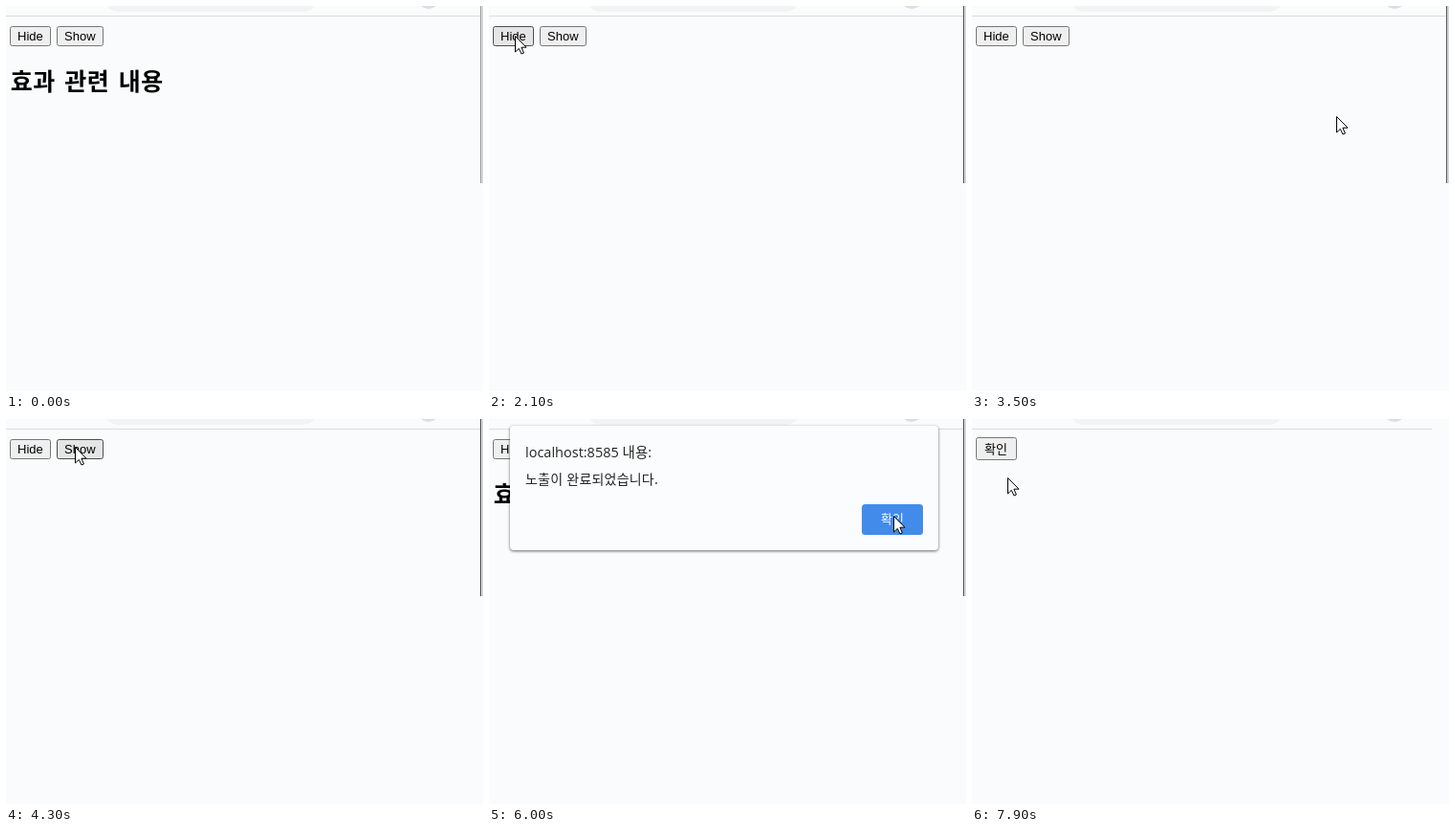
These frames come from a looping animation (499x402 px, 8000 ms). An HTML page:

```html
<!DOCTYPE html>
<html lang="ko">
<meta charset="utf-8">
<title>Hide and show</title>
<style>
  html, body { margin: 0; width: 100%; height: 100%; overflow: hidden; background: #f9fbfd; }
  svg { display: block; width: 499px; height: 402px; }
  text { font-family: "Liberation Sans", "Noto Sans CJK KR", "Noto Sans CJK", sans-serif; font-size: 13px; }
  .ko { font-family: "Noto Sans CJK KR", "Noto Sans CJK", sans-serif; }
  .button rect { fill: #efefef; stroke: #767676; }
  .button.hover rect { fill: #e5e5e5; stroke: #4c4c4c; }
  .button.focus rect { stroke: #2a2a2a; }
  #heading { font-size: 25px; font-weight: 700; letter-spacing: .5px; word-spacing: 2px; }
  #dialog text { fill: #222; }
  #dialog .panel { fill: #fbfcfe; filter: drop-shadow(0 1px 1.5px rgba(0, 0, 0, .6)); }
  #dialog .title { font: 14.5px "Open Sans", "Noto Sans CJK KR", "Noto Sans CJK", sans-serif; }
  #message { font-size: 14px; letter-spacing: .2px; }
  #dialog .label { fill: #fff; }
</style>
<svg viewBox="0 0 499 402">
  <rect x="103" y="-22" width="222" height="28" rx="14" fill="#f1f3f4"/>
  <circle cx="442" cy="-9" r="12" fill="#dcdde0"/>
  <rect id="rule" y="10" width="496" height="1" fill="#dadce0"/>
  <g id="edge">
    <rect x="496" width="1" height="185"/>
    <rect x="497" width="2" height="185" fill="#d2d3d5"/>
  </g>

  <g id="demo">
    <g id="hide" class="button">
      <rect x="4.5" y="21.5" width="42" height="20" rx="2"/>
      <text x="12" y="36">Hide</text>
    </g>
    <g id="show" class="button">
      <rect x="53.5" y="21.5" width="48" height="20" rx="2"/>
      <text x="61" y="36">Show</text>
    </g>
    <text id="heading" class="ko" x="4.7" y="88">효과 관련 내용</text>
  </g>

  <g id="next" class="button">
    <rect x="4.5" y="19.5" width="42" height="23" rx="2"/>
    <text class="ko" x="13" y="36">확인</text>
  </g>

  <g id="dialog">
    <rect class="panel" x="22" y="7" width="448" height="130" rx="4"/>
    <text class="title" x="38" y="40">localhost:8585 내용:</text>
    <text id="message" class="ko" x="38" y="68"></text>
    <rect id="ring" x="389.5" y="88.5" width="65" height="33" rx="4" fill="none" stroke="#a9cbf7"/>
    <rect x="390" y="89" width="64" height="32" rx="3.5" fill="#428bea"/>
    <text class="label ko" x="410" y="109">확인</text>
  </g>

  <path id="cursor" d="M.5 .5V17L4.3 13.4 7 19 9.4 18 6.9 12.2H12Z" fill="#fff" stroke="#000"/>
</svg>
<script>
  const LOOP = 8000, STEP = 100, FADE = 600, ALERT_FADE = 200;
  const HIDE_CLICK = 1500, SHOW_CLICK = 4500, PAGE_CHANGE = 7100;

  const $ = id => document.getElementById(id);
  const set = (id, name, value) => $(id).setAttribute(name, value);
  const display = (id, on) => { $(id).style.display = on ? "" : "none"; };
  const clamp = v => Math.max(0, Math.min(1, v));
  const swing = v => (1 - Math.cos(Math.PI * clamp(v))) / 2;
  const within = (t, from, to) => t >= from && t < to;
  const point = (x, y) => ({ x, y });

  // The pointer glides between a few resting points
  const onHide = point(27, 31), nearOk = point(388, 115), idle = point(381, 115);
  const onShow = point(72, 29), passing = point(176, 66), onOk = point(423, 101);
  const glides = [
    { start: 1000, end: 1300, from: point(31, -8), to: onHide },
    { start: 2200, end: 2800, from: onHide, to: nearOk },
    { start: 2800, end: 3500, from: nearOk, to: idle },
    { start: 3500, end: 4200, from: idle, to: onShow },
    { start: 4700, end: 5000, from: onShow, to: passing },
    { start: 5000, end: 5700, from: passing, to: onOk },
    { start: 6200, end: 6600, from: onOk, to: point(495, -22) },
    { start: 7600, end: 7900, from: point(201, 9), to: point(37, 61) }
  ];

  function pointerAt(t) {
    const glide = glides.findLast(g => t >= g.start);
    if (!glide) return null;
    const { start, end, from, to } = glide;
    const k = clamp((t - start) / (end - start));
    return [Math.round(from.x + (to.x - from.x) * k), Math.round(from.y + (to.y - from.y) * k)];
  }

  const alertOpacity = (t, open, close) =>
    Math.min(clamp((t - open) / ALERT_FADE), clamp(1 - (t - close) / ALERT_FADE));

  function draw(t) {
    const firstPage = t < PAGE_CHANGE;
    display("demo", firstPage);
    display("edge", firstPage);
    display("next", t > PAGE_CHANGE);
    set("rule", "width", firstPage ? 496 : 481);
    set("edge", "fill", t > HIDE_CLICK ? "#58595b" : "#a4a5a7");

    $("hide").classList.toggle("hover", within(t, 1200, 2300));
    $("hide").classList.toggle("focus", within(t, 2200, 3200));
    $("show").classList.toggle("hover", within(t, 4300, 4800));

    const faded = swing((t - HIDE_CLICK) / FADE) - swing((t - SHOW_CLICK) / FADE);
    set("heading", "opacity", 1 - faded);

    const shown = t >= SHOW_CLICK;
    $("message").textContent = (shown ? "노출이" : "숨김이") + " 완료되었습니다.";
    set("dialog", "opacity", shown ? alertOpacity(t, 5100, 6100) : alertOpacity(t, 2100, 3200));
    display("ring", !shown);

    const position = pointerAt(t);
    display("cursor", position);
    if (position) set("cursor", "transform", `translate(${position})`);
  }

  function tick() {
    draw(Math.floor(performance.now() % LOOP / STEP) * STEP);
    requestAnimationFrame(tick);
  }
  tick();
</script>
</html>
```
